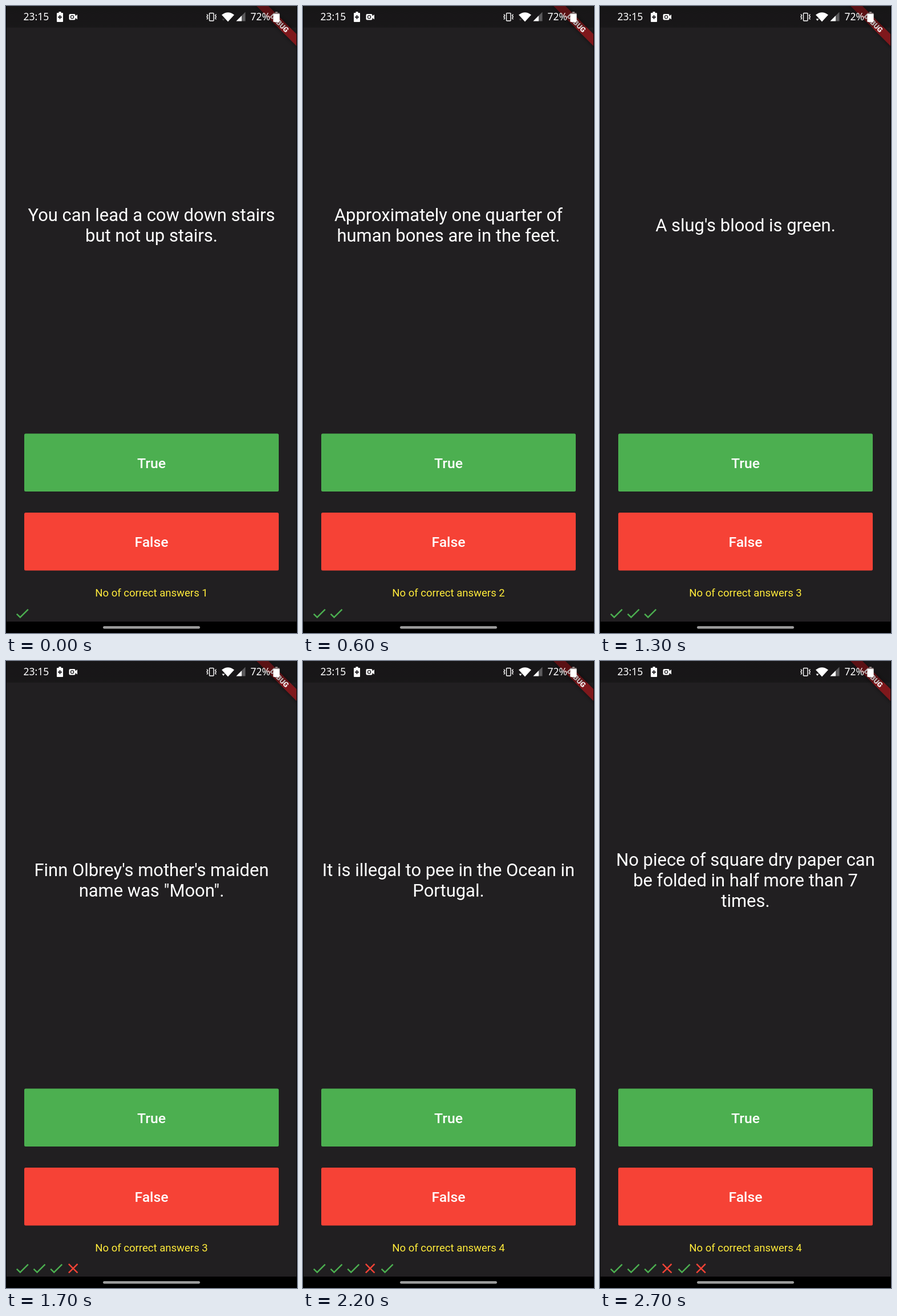
An HTML page for the animation above (3000 ms loop, 510 px wide and 1099 px high).

```html
<!DOCTYPE html>
<html lang="en">
<head>
<meta charset="utf-8">
<title>Quiz</title>
<style>
  html, body { margin: 0; width: 100%; height: 100%; overflow: hidden; background: #000; }
  svg { display: block; width: 100%; height: 100%; }
  text { font-family: Roboto, "Open Sans", sans-serif; fill: #fff; text-anchor: middle; }
  .question { font-size: 30.94px; }
  .answer { font-size: 24.75px; font-weight: 500; }
  .score { font-size: 18.56px; fill: #ffeb3b; }
  .status { font: 17.5px "Noto Sans", "Open Sans", sans-serif; text-anchor: start; }
  .ribbon { font-size: 12.6px; font-weight: 900; }
</style>
</head>
<body>
<svg viewBox="0 0 510 1099">
  <defs>
    <filter id="soft" x="-20%" y="-60%" width="140%" height="220%">
      <feGaussianBlur stdDeviation="3"/>
    </filter>
    <linearGradient id="scrim" x2="0" y2="1">
      <stop offset="0" stop-opacity=".3"/>
      <stop offset=".9" stop-opacity=".27"/>
      <stop offset="1" stop-opacity=".2"/>
    </linearGradient>
    <clipPath id="page"><rect x="1" width="508" height="1079"/></clipPath>
    <path id="right" fill="#4caf50" d="M9 16.17 4.83 12l-1.42 1.41L9 19 21 7l-1.41-1.41z"/>
    <path id="wrong" fill="#f44336" d="M19 6.41 17.59 5 12 10.59 6.41 5 5 6.41 10.59 12 5 17.59 6.41 19 12 13.41 17.59 19 19 17.59 13.41 12z"/>
    <path id="battery" d="M3.5 0h4v2H10q1 0 1 1v14q0 1-1 1H1q-1 0-1-1V3q0-1 1-1h2.5z"/>
  </defs>

  <g clip-path="url(#page)">
    <rect x="1" width="508" height="1079" fill="#211f21"/>

    <g id="question"></g>

    <rect x="32" y="749.5" width="446" height="101.5" rx="2.5" fill="#4caf50"/>
    <text class="answer" x="255" y="809.5">True</text>
    <rect x="32" y="888" width="446" height="101.5" rx="2.5" fill="#f64236"/>
    <text class="answer" x="255" y="948">False</text>

    <text class="score" id="score" x="255" y="1035"></text>
    <g id="marks"></g>

    <g transform="translate(509 0) rotate(45)">
      <rect x="-55" y="34.65" width="110" height="14.85" opacity=".5" filter="url(#soft)"/>
      <rect x="-55" y="34.65" width="110" height="14.85" fill="#7f181c"/>
      <text class="ribbon" x="0" y="46.6">DEBUG</text>
    </g>
    <rect width="510" height="38" fill="url(#scrim)"/>
  </g>

  <!-- status bar -->
  <text class="status" x="30.5" y="25.3">23:15</text>
  <text class="status" x="428.5" y="25.3">72%</text>
  <g fill="#fff">
    <use href="#battery" x="89" y="10"/>
    <path d="M94.5 16v7M91 19.5h7" stroke="#17161a" stroke-width="1.8"/>
    <rect x="110.5" y="14" width="11" height="10.5" rx="2"/>
    <path d="M121 18l4-3v8.5l-4-3z"/>
    <circle cx="116" cy="19.2" r="2.6" fill="none" stroke="#17161a" stroke-width="1.3"/>
    <g fill="none" stroke="#fff" stroke-width="1.4">
      <rect x="356.5" y="12.5" width="7.5" height="13.5" rx="1"/>
      <path d="M352 14.5l1.6 2.2-1.6 2.3 1.6 2.3-1.6 2.2M368.3 14.5l-1.6 2.2 1.6 2.3-1.6 2.3 1.6 2.2"/>
    </g>
    <path d="M389 27.5L378 15.5Q389 7 400 15.5z"/>
    <path id="traffic" d="M378.5 22.5h5l-2.5 3.5z"/>
    <path d="M403.5 26.5h16v-16z" fill="#5b5a5c"/>
    <path d="M403.5 26.5h9.5v-9.5z"/>
    <use href="#battery" x="468.5" y="10" fill="#8d8080"/>
    <path d="M468.5 14h11v13q0 1-1 1h-9q-1 0-1-1z"/>
  </g>

  <rect x="170" y="1087" width="170" height="4.5" rx="2.25" fill="#9b9b9b"/>
</svg>

<script>
const LOOP = 3000, UNIT = 1.2375, LINE = 36, MIDDLE = 395;

// start time, score, answers so far (1 right, 0 wrong), lines
const scenes = [
  [0, 1, "1", "You can lead a cow down stairs", "but not up stairs."],
  [600, 2, "11", "Approximately one quarter of", "human bones are in the feet."],
  [1100, 3, "111", "A slug's blood is green."],
  [1600, 3, "1110", "Finn Olbrey's mother's maiden", "name was \"Moon\"."],
  [2000, 4, "11101", "It is illegal to pee in the Ocean in", "Portugal."],
  [2500, 4, "111010", "No piece of square dry paper can", "be folded in half more than 7", "times."]
];

const el = id => document.getElementById(id);
let shown;

function show(scene) {
  const [start, score, answers, ...lines] = scene;
  const top = MIDDLE - (lines.length - 1) * LINE / 2;
  el("question").innerHTML = lines.map((line, i) =>
    `<text class="question" x="255" y="${top + i * LINE}">${line}</text>`).join("");
  el("score").textContent = "No of correct answers " + score;
  el("marks").innerHTML = [...answers].map((ok, i) =>
    `<use href="#${ok === "1" ? "right" : "wrong"}" transform="translate(${13.7 + i * 24 * UNIT} 1049.8) scale(${UNIT})"/>`).join("");
  el("traffic").setAttribute("opacity", start < 1100 ? .2 : 1);
}

function tick() {
  const t = performance.now() % LOOP;
  const scene = scenes.filter(s => s[0] <= t).pop();
  if (scene !== shown) show(shown = scene);
  requestAnimationFrame(tick);
}
tick();
</script>
</body>
</html>
```
